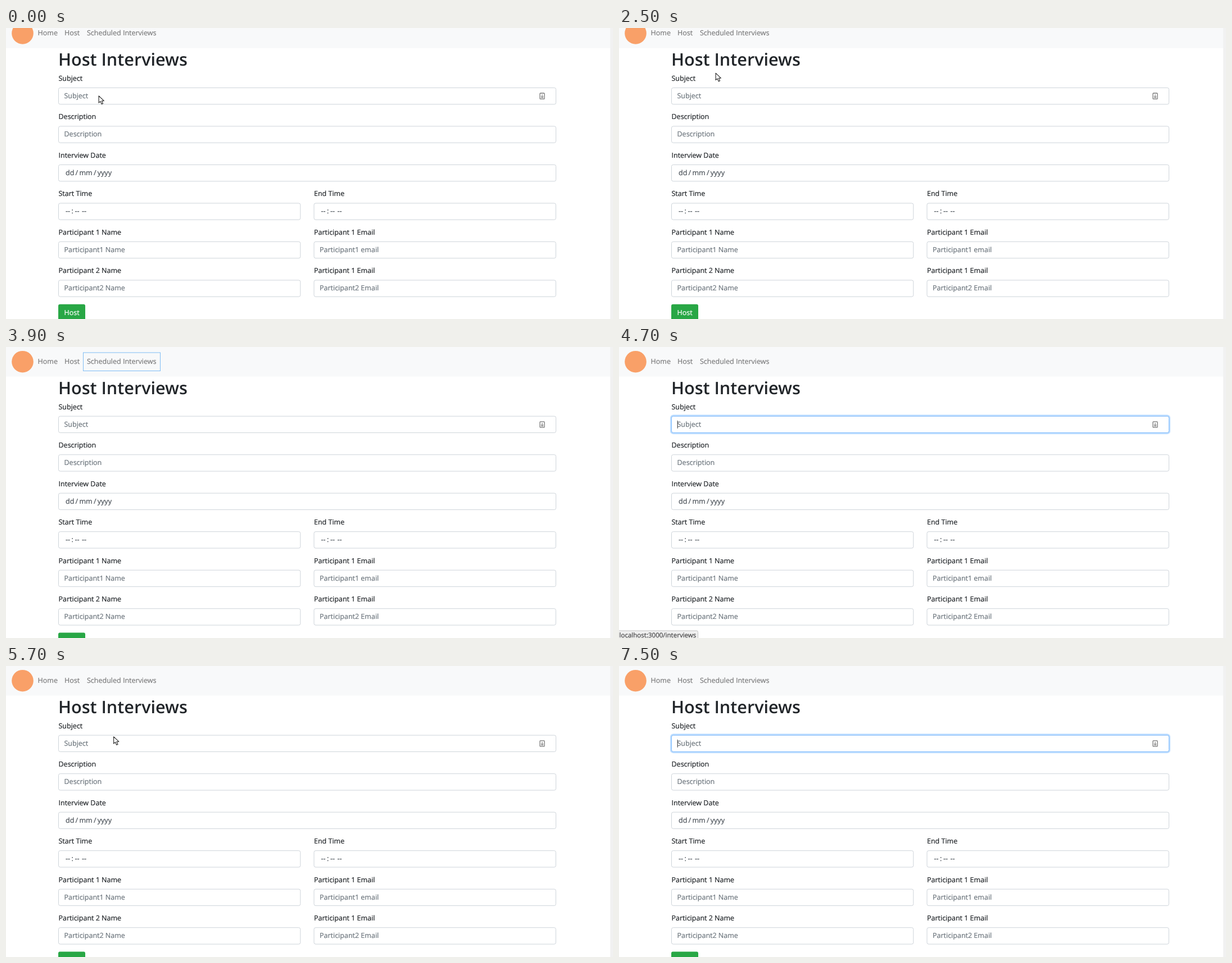
Write an HTML page that moves like this. It is 1080x518 px and loops after 8 s.

```html
<!DOCTYPE html>
<html lang="en">
<head>
<meta charset="utf-8">
<title>Host Interviews</title>
<style>
  html, body { margin: 0; width: 100%; height: 100%; overflow: hidden; background: #fff; }
  svg { display: block; width: 1080px; height: 518px; }
  text {
    font: 12.5px "Open Sans", "Noto Sans", sans-serif; text-rendering: geometricPrecision;
    color: #212529; fill: currentColor; stroke: currentColor; stroke-width: .22px;
  }
  .title { font-size: 30.6px; font-weight: 600; stroke: none; }
  .nav { color: #7c7c7d; }
  .hint { color: #6c757d; }
  .value { color: #495057; word-spacing: -1px; }
  .light { color: #fff; }
  .status { font-size: 11.55px; color: #444; }
  .field { fill: #fff; stroke: #ced4da; }
</style>
</head>
<body>
<svg viewBox="0 0 1080 518">
  <g id="page">
    <rect width="1075" height="52.5" fill="#f8f9fa"/>
    <circle cx="29.5" cy="26.2" r="19.3" fill="#f9a068"/>
    <rect id="outline" x="137.5" y="10" width="137" height="32.5" fill="none" stroke="#80bdf5"/>
    <g id="form"></g>
    <g id="focus" fill="none">
      <rect x="92.2" y="121.9" width="887.6" height="32" rx="4.5" stroke="#bfdeff" stroke-width="2.6"/>
      <rect x="93.5" y="123.2" width="885" height="29.4" rx="3" stroke="#80bdff"/>
    </g>
    <path id="caret" d="M104.2 131v14" stroke="#333"/>
    <g stroke="#777" fill="none">
      <rect x="950" y="132.8" width="8" height="10.4" rx="1" stroke-width="1.3"/>
      <path d="M954 135v2.4M952 138.6h4M952 140.6h4" stroke-width="1.2"/>
    </g>
    <rect x="93" y="508.6" width="48" height="30.3" rx="3" fill="#28a745"/>
    <text class="light" x="103.5" y="527.5">Host</text>
  </g>
  <rect x="1075" width="5" height="518" fill="#f1f1f1"/>
  <g id="status">
    <path d="M-1 505H138q2.5 0 2.5 2.5V519H-1Z" fill="#f0f0f0" stroke="#c4c4c4"/>
    <text class="status" x="0.5" y="517">localhost:3000/interviews</text>
  </g>
  <path id="cursor" d="M.6.8V13.2L3.5 10.6L5.7 15.4L8 14.4L5.9 9.7H9.8Z" fill="#fff" stroke="#222" stroke-width="1.1" stroke-linejoin="round"/>
</svg>
<script>
const $ = id => document.getElementById(id);
const LOOP = 8000, TICK = 100, SCROLL = 16.8, ROW = 68.5, LEFT = 93.5, RIGHT = 548;
const CLOCK = "--&#8201;:&#8201;--&nbsp;&nbsp;--";

const text = (x, y, words, kind) => `<text class="${kind}" x="${x}" y="${y}">${words}</text>`;

function field(x, row, width, label, words, kind = "hint") {
  const y = 123.2 + row * ROW;
  return text(x, y - 12.7, label, "label") +
    `<rect class="field" x="${x}" y="${y}" width="${width}" height="29.4" rx="3"/>` +
    text(x + (kind === "hint" ? 10 : 12.5), y + 18.5, words, kind);
}
const wide = (row, ...rest) => field(LEFT, row, 885, ...rest);
const half = (x, row, ...rest) => field(x, row, 430.3, ...rest);

$("form").innerHTML =
  text(56.5, 30.2, "Home", "nav") +
  text(104, 30.2, "Host", "nav") +
  text(144, 30.2, "Scheduled Interviews", "nav") +
  text(93, 83.7, "Host Interviews", "title") +
  wide(0, "Subject", "Subject") +
  wide(1, "Description", "Description") +
  wide(2, "Interview Date", "dd / mm / yyyy", "value") +
  half(LEFT, 3, "Start Time", CLOCK, "value") +
  half(RIGHT, 3, "End Time", CLOCK, "value") +
  half(LEFT, 4, "Participant 1 Name", "Participant1 Name") +
  half(RIGHT, 4, "Participant 1 Email", "Participant1 email") +
  half(LEFT, 5, "Participant 2 Name", "Participant2 Name") +
  half(RIGHT, 5, "Participant 1 Email", "Participant2 Email");

const ramp = (t, from, to) => Math.min(1, Math.max(0, (t - from) / (to - from)));
const during = (t, from, to) => t >= from && t < to;
// Fades in before `full` and out before `gone`, over two ticks each.
const pulse = (t, full, gone) => ramp(t, full - 2 * TICK, full) - ramp(t, gone - 2 * TICK, gone);
const show = (id, opacity) => $(id).setAttribute("opacity", Number(opacity));
const move = (id, x, y) => $(id).setAttribute("transform", `translate(${x} ${y})`);

// Glides of the pointer, each from where the last one ended: start, end, x, y
const glides = [
  [1100, 1600, 206, 0],
  [1700, 2500, 171.5, 79.5],
  [2900, 3000, 139, 127],
  [3300, 3500, 162, 19],
  [4700, 5400, 223, 115],
  [5400, 5700, 191, 125],
  [5900, 6100, 179, 141],
  [6300, 6900, 181, 118],
  [6900, 7200, 169, 21]
];

function pointer(t) {
  let x = 164.5, y = 120;
  for (const [start, end, toX, toY] of glides) {
    const k = ramp(t, start, end);
    x += (toX - x) * k;
    y += (toY - y) * k;
  }
  return [x, y];
}

function draw(now) {
  const t = Math.floor(now % LOOP / TICK) * TICK;
  move("page", 0, t < 3900 ? -SCROLL : 0);
  show("focus", pulse(t, 4700, 5400) + pulse(t, 7500, LOOP + 500));
  show("status", pulse(t, 4200, 4900));
  show("caret", during(t, 4600, 5200) || t >= 7400);
  show("outline", during(t, 3900, 4600));
  show("cursor", t < 1700 || during(t, 2500, 3600) || during(t, 5000, 6300) || during(t, 6900, 7300));
  move("cursor", ...pointer(t));
  requestAnimationFrame(draw);
}
draw(0);
</script>
</body>
</html>
```
